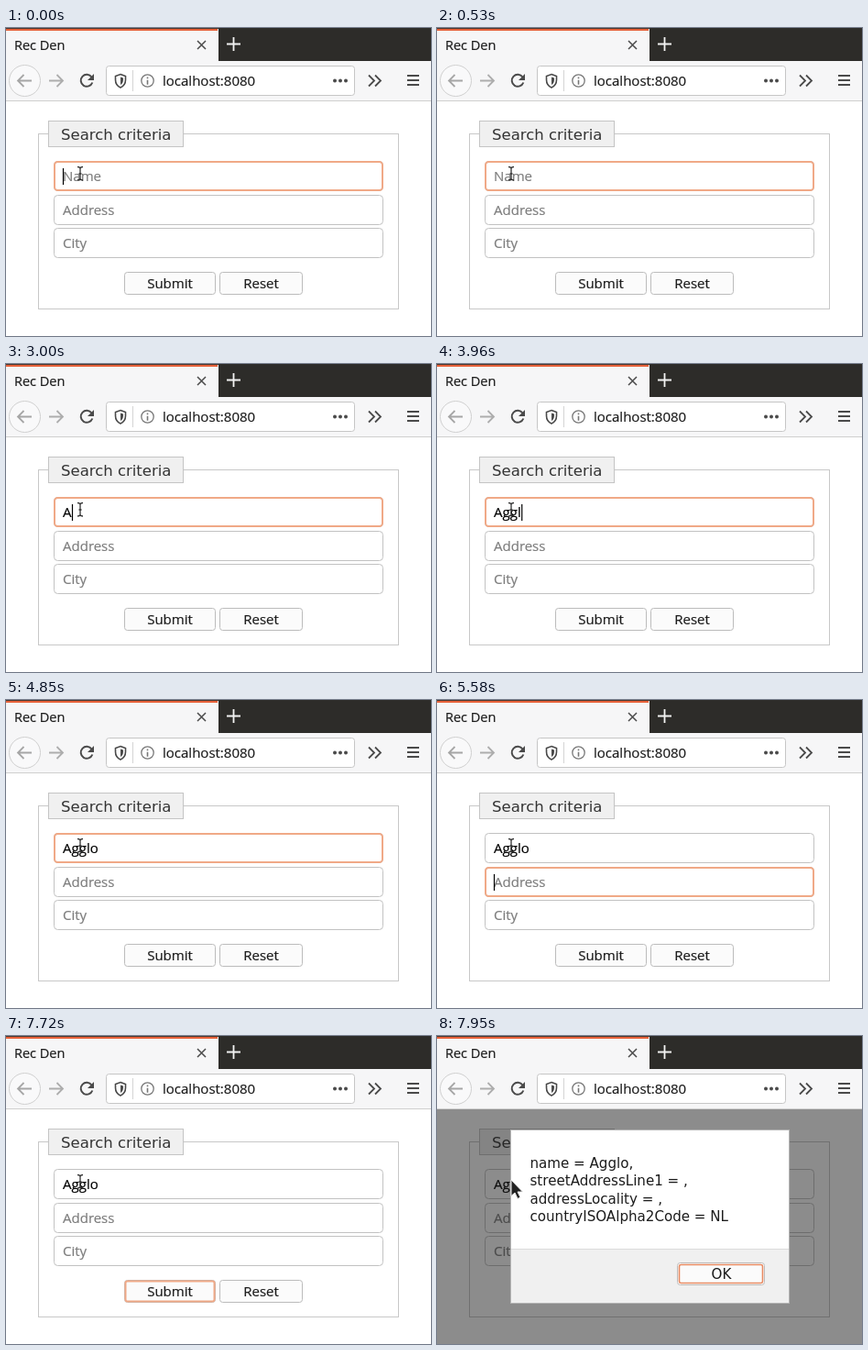
Recreate the animation shown at these times as an HTML page. Size 464 by 336 pixels, loop 7.99 s.

```html
<!DOCTYPE html>
<html lang="en">
<head>
<meta charset="utf-8">
<title>Search form</title>
<style>
  html, body { margin: 0; width: 100%; height: 100%; overflow: hidden; background: #fff; }
  svg { display: block; width: 464px; height: 336px; }
  text { font: 15px "Open Sans", "Noto Sans", sans-serif; fill: #1c1c1c; stroke: #1c1c1c; stroke-width: .2; white-space: pre; }
  .wide { font: 15.1px "DejaVu Sans", sans-serif; stroke: none; }
  .mid { text-anchor: middle; }
  .line { fill: none; stroke: #4a4a4a; stroke-width: 1.8; }
  .box { fill: #fff; stroke: #c2c2c2; }
  .button { fill: #fbfbfb; stroke: #bcbcbc; }
  .ring { fill: none; stroke: #f0a987; stroke-width: 2; }
  .hint { fill: #7d7d7d; stroke: #7d7d7d; }
  .typed { fill: #000; stroke: #000; }
</style>
</head>
<body>
<svg viewBox="0 0 464 336">
  <!-- browser chrome -->
  <rect width="464" height="80" fill="#f6f6f7"/>
  <rect x="232" width="232" height="36" fill="#2d2c29"/>
  <rect width="232" height="1" fill="#4a3a33"/>
  <rect y="1" width="231" height="2" fill="#e8623a"/>
  <text x="9" y="23.500" style="font-size:14.5px">Rec Den</text>
  <path class="line" d="M209 14l9 9m0-9l-9 9" style="stroke-width:1.5"/>
  <path class="line" d="M241 17.500h15m-7.500-7.500v15" style="stroke:#f2f2f2"/>
  <path d="M0 79.500H464" stroke="#cfcfcf"/>

  <circle cx="20.500" cy="57.500" r="17" fill="#f9f9fa" stroke="#d0d0d0"/>
  <path class="line" d="M28 57.500H13m6.500-6.500l-6.500 6.500l6.500 6.500" style="stroke:#a6a6a6"/>
  <path class="line" d="M47 57.500h15m-6.500-6.500l6.500 6.500l-6.500 6.500" style="stroke:#adadad"/>
  <path class="line" d="M93.500 53.500A6.500 6.500 0 1 0 94.300 59.500" style="stroke-width:2"/>
  <path d="M96 50v7h-7z" fill="#4a4a4a"/>

  <rect x="109.500" y="41.500" width="271" height="32" rx="3" fill="#fff" stroke="#c6c6c6"/>
  <path class="line" d="M125 50.500l5.500 2v4q0 6-5.500 8.500q-5.500-2.500-5.500-8.500v-4z" style="stroke-width:1.6"/>
  <path d="M125 53.500v8.500q3-2 3-5.500v-2z" fill="#4a4a4a"/>
  <path d="M138.500 46v23" stroke="#d4d4d4"/>
  <circle class="line" cx="154.500" cy="57.500" r="6.700" style="stroke:#777;stroke-width:1.3"/>
  <path class="line" d="M154.500 53.500v1.700m0 1.500v5" style="stroke:#777;stroke-width:1.6"/>
  <text x="171" y="63">localhost:8080</text>
  <g fill="#4a4a4a">
    <circle cx="359" cy="57.500" r="2"/><circle cx="365" cy="57.500" r="2"/><circle cx="371" cy="57.500" r="2"/>
  </g>
  <path class="line" d="M396 51.500l6 6l-6 6m7-12l6 6l-6 6"/>
  <path class="line" d="M438 52h13m-13 5h13m-13 5h13"/>

  <!-- form -->
  <rect x="35.500" y="115.500" width="393" height="191" fill="none" stroke="#c8c8c8"/>
  <rect x="46.500" y="101.500" width="147" height="28" fill="#f0f0f0" stroke="#c4c4c4"/>
  <text class="wide" x="60" y="122" style="font-size:16.5px;fill:#333">Search criteria</text>
  <g id="fields"></g>
  <rect class="button" x="129.500" y="266.500" width="99" height="24" rx="3"/>
  <rect class="button" x="233.500" y="266.500" width="90" height="24" rx="3"/>
  <text class="mid" x="179" y="284">Submit</text>
  <text class="mid" x="278.500" y="284">Reset</text>
  <rect class="ring" id="submitRing" x="130.500" y="267.500" width="97" height="22" rx="2"/>
  <path id="caret" stroke="#000" stroke-width="1.200"/>
  <path id="beam" d="M78 151.500q2.500 0 3 1.500q.5-1.500 3-1.500M81 153v12M78 166q2.500 0 3-1.500q.5 1.500 3 1.500M79.500 159h3"
        fill="none" stroke="#333" stroke-width="1.300"/>

  <!-- alert -->
  <g id="alert">
    <rect y="80" width="464" height="256" fill="#1a1a1a" opacity=".5"/>
    <rect x="80.500" y="102.500" width="304" height="189" fill="#fff" stroke="#b5b5b5"/>
    <path d="M81 232.500h303v58.500h-303z" fill="#f0f0f0"/>
    <path d="M81 232.500h303" stroke="#dcdcdc"/>
    <g id="message"></g>
    <rect class="button" x="262.500" y="247.500" width="95" height="24" rx="3"/>
    <rect class="ring" x="264.500" y="249.500" width="91" height="20" rx="2" style="stroke:#e88b63;stroke-width:1.6"/>
    <text class="wide mid" x="310.500" y="265">OK</text>
    <path d="M81 157v17.500l4-3.500l3 6.500l3-1.500l-3-6h5.500z" fill="#222" stroke="#eee"/>
  </g>
</svg>
<script>
const LOOP = 7990, BLINK = 600;
const WORD = "Agglo", FIRST_KEY = 2850, KEY_GAP = 330;
const keyTimes = [...WORD].map((_, i) => FIRST_KEY + i * KEY_GAP);
const focusTimes = [0, 5000, 5700, 6250];   // name, address, city, submit
const ALERT_TIME = 7750;
const FIRST_BLINK = -490;

const get = id => document.getElementById(id);
const show = (el, on) => el.setAttribute("visibility", on ? "visible" : "hidden");
const countPast = (times, t) => times.filter(x => x <= t).length;

function add(parent, tag, attrs, text = "") {
  const el = document.createElementNS("http://www.w3.org/2000/svg", tag);
  for (const key in attrs) el.setAttribute(key, attrs[key]);
  el.textContent = text;
  return parent.appendChild(el);
}

const fields = ["Name", "Address", "City"].map((hint, i) => {
  const y = 145.5 + Math.round(i * 36.5), parent = get("fields");
  add(parent, "rect", { x: 52.5, y, width: 359, height: 32, rx: 4, class: "box" });
  return {
    y,
    ring: add(parent, "rect", { x: 53, y: y + .5, width: 358, height: 31, rx: 3.5, class: "ring" }),
    label: add(parent, "text", { x: 62, y: y + 21.8, class: "hint" }, hint)
  };
});

["name = Agglo,", "streetAddressLine1 = ,", "addressLocality = ,", "countryISOAlpha2Code = NL"]
  .forEach((line, i) => add(get("message"), "text", { x: 101.5, y: 144 + i * 19.4, class: "wide" }, line));

function render(t) {
  const typed = countPast(keyTimes, t);
  const focus = countPast(focusTimes, t) - 1;
  const name = fields[0].label;
  name.textContent = typed ? WORD.slice(0, typed) : "Name";
  name.setAttribute("class", typed ? "typed" : "hint");
  fields.forEach((field, i) => show(field.ring, i === focus));
  show(get("submitRing"), focus === 3);

  // every key press or focus change restarts the blink
  const restart = Math.max(FIRST_BLINK, ...[...keyTimes, ...focusTimes.slice(1)].filter(x => x <= t));
  const lit = Math.floor((t - restart) / BLINK) % 2 === 0;
  show(get("caret"), focus < 3 && lit);
  if (focus < 3) {
    const x = focus === 0 && typed ? 63 + name.getComputedTextLength() : 62.5;
    get("caret").setAttribute("d", `M${x} ${fields[focus].y + 7.5}v18`);
  }

  show(get("alert"), t >= ALERT_TIME);
  show(get("beam"), t < ALERT_TIME);
}

const start = performance.now();
function tick() {
  render((performance.now() - start) % LOOP);
  requestAnimationFrame(tick);
}
tick();
</script>
</body>
</html>
```
